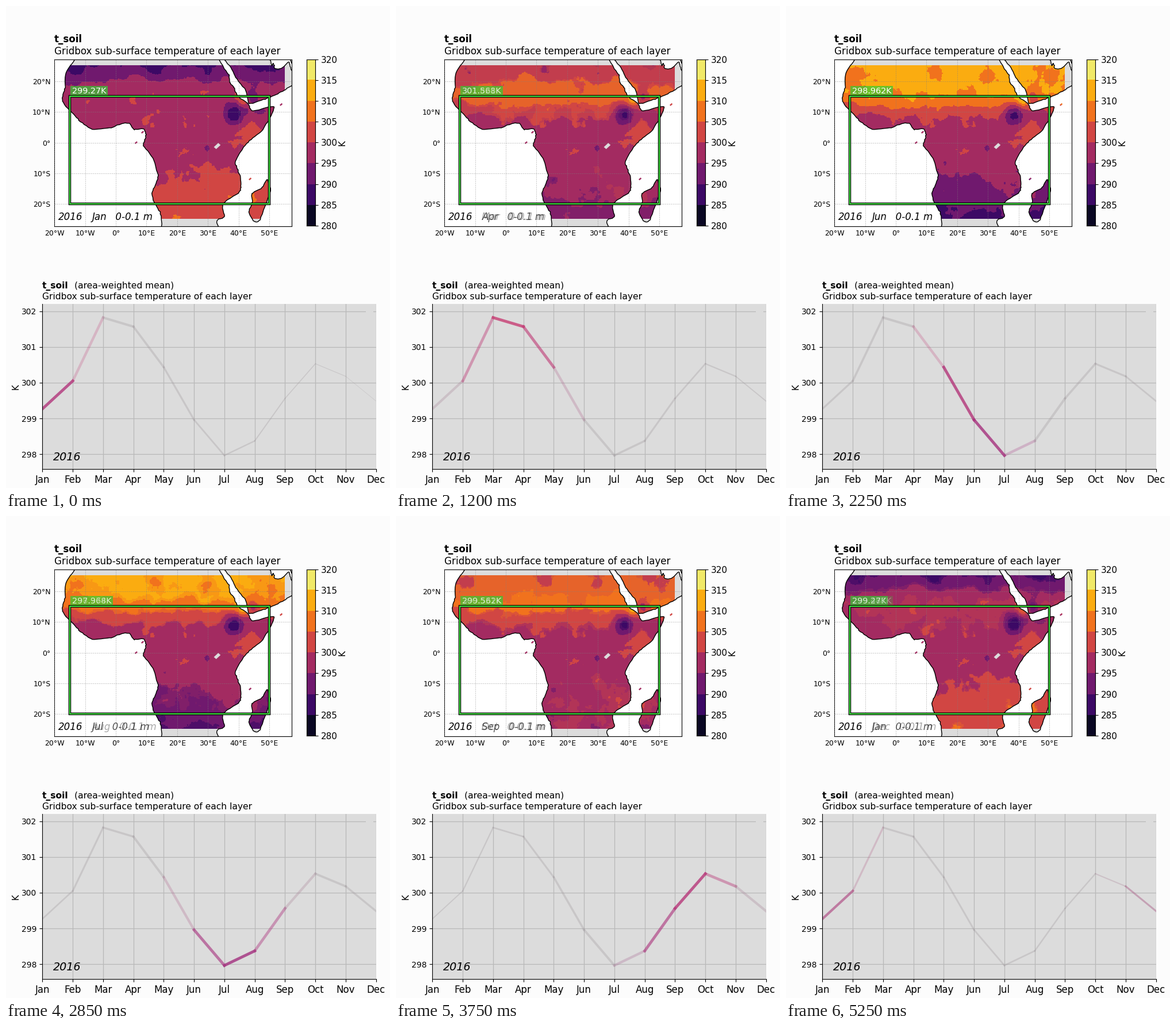
These frames come from a looping animation (668x838 px, 5.4 s). A matplotlib script:

```python
import numpy as np
import matplotlib.pyplot as plt
from matplotlib.animation import FuncAnimation
from matplotlib.patches import PathPatch, Rectangle
from matplotlib.path import Path

W, H, DPI = 668, 838, 100
STEPS = 3  # frames per month
MONTHS = "Jan Feb Mar Apr May Jun Jul Aug Sep Oct Nov Dec".split()
MEANS = [299.27, 300.051, 301.821, 301.568, 300.434, 298.962,
         297.968, 298.374, 299.562, 300.531, 300.179, 299.487]
LAND = "#dcdcdc"
GREEN = "limegreen"
PAPER = "#fcfcfc"
LONG_NAME = "Gridbox sub-surface temperature of each layer"

plt.rcParams["font.family"] = "DejaVu Sans"
inferno, magma = plt.get_cmap("inferno"), plt.get_cmap("magma")
BANDS = inferno((np.arange(8) + 0.5) / 8)[:, :3]
rng = np.random.default_rng(7)

# Key points of the coasts as (lon, lat)
AFRICA = [(-13.4, 27), (-16.2, 22.8), (-16.4, 18), (-17.4, 14.7),
          (-16.7, 12.3), (-13.3, 8.8), (-11.3, 6.7), (-7.6, 4.4), (-2, 4.8),
          (2.5, 6.3), (4.6, 6.2), (6, 4.3), (8.8, 4.6), (9.8, 3), (9.4, 0.5),
          (9, -1), (12, -5), (13.7, -10.7), (13, -13.5), (11.8, -16.5),
          (12.3, -19), (14.4, -22.5), (15, -27), (15, -30), (33, -30),
          (32.8, -25.5), (35.4, -24), (34.8, -20), (39.8, -16.4),
          (40.7, -14.5), (40.5, -11), (39.4, -8), (38.9, -6), (41.4, -1.8),
          (44, 1.1), (47.9, 4.4), (50.9, 9.5), (51.2, 11.8), (44.6, 10.4),
          (43, 12.8), (39.6, 15.3), (38.5, 18), (37.2, 19.5), (36.8, 22),
          (35.4, 24), (33.4, 27.8), (33, 30), (-13, 30)]
ARABIA = [(35, 27.8), (37.2, 24.8), (39.1, 21.2), (42.3, 17), (43.4, 12.7),
          (48, 14), (52.2, 15.7), (55.2, 17.3), (59, 20), (57, 24),
          (56.3, 26.2), (53.8, 24.1), (51.8, 24.2), (51.3, 26), (50.7, 25),
          (49.5, 27.8), (40, 30)]
MADAGASCAR = [(49.3, -12), (50.4, -15.5), (49.3, -18.5), (47, -25),
              (45, -25.6), (43.4, -22.5), (44.4, -19.5), (44.3, -16.6),
              (47.6, -14.6)]
GULF = [(56.4, 28), (57.3, 25.7), (59, 28)]
ISLETS = [(53.8, 12.4), (6.6, 0), (8.7, 3.4), (43.7, -11.8)]
LAKE = (33, -1.1)


def coastline(points, n=6, pull=0.36, rough=0.08):
    """Closed cardinal spline with a little seeded roughness."""
    p1 = np.array(points, float)
    p0, p2, p3 = (np.roll(p1, s, axis=0) for s in (1, -1, -2))
    u = (np.arange(n) / n)[:, None, None]
    ring = ((2 * u**3 - 3 * u**2 + 1) * p1 + (3 * u**2 - 2 * u**3) * p2
            + (u**3 - 2 * u**2 + u) * pull * (p2 - p0)
            + (u**3 - u**2) * pull * (p3 - p1))
    ring = ring.transpose(1, 0, 2).reshape(-1, 2)
    return ring + rough * rng.standard_normal(ring.shape)


def diamond(center, r):
    return np.array(center) + r * np.array([(-1, -0.3), (0.3, 0.9), (1, 0.3),
                                            (-0.3, -0.9)])


def outline(rings):
    return Path.make_compound_path(
        *[Path([*r, r[0]], closed=True) for r in rings])


# Soil temperature field
HILLS_AND_PLAINS = [  # lon, lat, radius, anomaly
    (38.5, 9.2, 3.5, -12), (44.3, 15, 1.7, -7), (41.3, 13.6, 2, 8),
    (43, 4, 5, 5.5), (33, 11, 5, 2.5), (29.6, -2, 1.6, -4.5),
    (15.7, -12.3, 1.5, -4), (38, -15, 5, 2.5), (44.5, -18, 2.5, 3)]
CELL = 0.25
lon, lat = np.meshgrid(np.arange(-18, 54.8, CELL), np.arange(-24.8, 25, CELL))


def noise():
    ny, nx = lon.shape
    k = np.hypot(np.fft.fftfreq(ny, CELL)[:, None], np.fft.fftfreq(nx, CELL))
    spec = np.fft.fft2(rng.standard_normal(lon.shape)) / (k + 0.06) ** 2.2
    spec[0, 0] = 0
    out = np.fft.ifft2(spec).real
    return out / out.std()


def bell(x, center, width):
    return np.exp(-((x - center) / width) ** 2)


def month_image(m, relief):
    north, south = np.maximum(lat - 8, 0), np.maximum(-4 - lat, 0)
    yearly = np.cos(2 * np.pi * (m - 5.5 - 0.35 * np.sign(lat)) / 12)
    twice = np.cos(2 * np.pi * (m - 3.7) / 6)
    t = 298 + 6 * bell(lat, 16, 6) + 0.27 * np.maximum(lat - 16, 0)
    t += (0.68 * north - 0.38 * south) * yearly - 0.07 * south
    t += 2.7 * bell(lat, 13, 5) * twice
    for x, y, r, anomaly in HILLS_AND_PLAINS:
        t += anomaly * bell(lon, x, r) * bell(lat, y, r)
    t += 1.1 * relief
    return BANDS[np.clip((t - 280) // 5, 0, 7).astype(int)]


shores = [coastline(p) for p in (AFRICA, ARABIA, MADAGASCAR)]
relief = noise()
IMAGES = [month_image(m, relief) for m in range(12)]


# Layout, in pixels from the top left
fig = plt.figure(figsize=(W / DPI, H / DPI), dpi=DPI, facecolor=PAPER)


def add_axes(x0, y0, x1, y1, **kw):
    return fig.add_axes([x0 / W, 1 - y1 / H, (x1 - x0) / W, (y1 - y0) / H], **kw)


page = add_axes(0, 0, W, H, zorder=5)
page.set(xlim=(0, W), ylim=(H, 0))
page.axis("off")


def write(x, y, s, size, **kw):
    return page.text(x, y, s, fontsize=size, **kw)


def degrees(values, negative, positive):
    return [f"{abs(v)}°{negative if v < 0 else positive if v else ''}"
            for v in values]


# Map
world = add_axes(84, 92.6, 497.3, 382.6)
world.set_facecolor("white")
coast = outline(shores + [GULF])
world.add_patch(PathPatch(coast, fc=LAND, ec="none", zorder=1))
soil = world.imshow(IMAGES[0], origin="lower", aspect="auto",
                    extent=(-18, 54.8, -24.8, 25),
                    interpolation="nearest", zorder=2)
soil.set_clip_path(outline(shores + [diamond(c, 0.5) for c in ISLETS]),
                   world.transData)
world.add_patch(PathPatch(outline([diamond(LAKE, 1.1)]), fc=LAND, ec="none",
                          zorder=3))
world.add_patch(PathPatch(coast, fc="none", ec="black", lw=1, zorder=4))
world.set(xlim=(-20.02, 57.3), ylim=(-27.13, 27.13))
east, up = range(-20, 51, 10), range(-20, 21, 10)
world.set_xticks(east, degrees(east, "W", "E"))
world.set_yticks(up, degrees(up, "S", "N"))
world.tick_params(length=0, pad=4.7, labelsize=9)
world.set_axisbelow(False)
world.grid(color="gray", alpha=0.55, lw=0.5, ls="--")
for lw, color in ((3.2, "black"), (1.5, "#3fdc3f")):
    world.add_patch(Rectangle((-15, -20), 65, 35, fc="none", ec=color, lw=lw,
                              zorder=6, joinstyle="miter"))

write(83.5, 63, "t_soil", 12.1, weight="bold")
write(83.5, 84.5, LONG_NAME, 12.05)
write(91, 371.5, "2016", 12, style="italic")
tag_end = Rectangle((177, 139), 9, 16, fc=GREEN, lw=0)
page.add_patch(Rectangle((112, 139), 65, 16, fc=GREEN, alpha=0.7, lw=0))
page.add_patch(tag_end)
stamps = [write(149.4, 371.5, "", 12, style="italic") for _ in range(2)]
values = [write(114.5, 151.5, "", 10.4, color="white") for _ in range(2)]

# Colour bar
bar = add_axes(523, 92.6, 538, 382)
bar.imshow(BANDS[:, None], origin="lower", aspect="auto",
           extent=(0, 1, 280, 320), interpolation="nearest")
bar.set_xticks([])
bar.set_yticks(range(280, 321, 5))
bar.yaxis.tick_right()
bar.tick_params(labelsize=11)
write(585, 238, "K", 11, rotation=90, ha="center", va="center")

# Chart
chart = add_axes(63.4, 517.5, 643.7, 804.9, facecolor=LAND)
chart.set(xlim=(0, 11), ylim=(297.59, 302.21))
chart.set_xticks(range(12), MONTHS, fontsize=12)
chart.set_yticks(range(298, 303))
chart.tick_params(axis="y", labelsize=10)
chart.set_axisbelow(True)
chart.grid(color="#b8b8b8", lw=0.9)
chart.spines[["top", "right"]].set_visible(False)
page.add_patch(Rectangle((626, 523), 13, 14, fc=LAND, lw=0))
write(63, 491, "t_soil", 11.2, weight="bold")
write(119, 491, "(area-weighted mean)", 11.2)
write(63, 510, LONG_NAME, 11.2)
write(82, 790, "2016", 13.8, style="italic")
write(17, 661.5, "K", 11, rotation=90, ha="center", va="center")
segments = [chart.plot([k, k + 1], MEANS[k:k + 2],
                       solid_capstyle="projecting")[0] for k in range(11)]


def segment_style(k, m):
    """Colour, opacity and width in pixels of segment k in month m."""
    d = abs(k + 0.5 - m)
    rgb = np.array(magma((sum(MEANS[k:k + 2]) / 2 - 280) / 40)[:3])
    width = 4.9 - 0.42 * (d - 0.5)
    if d < 1:
        return rgb, 0.8, width
    if d < 2:
        return rgb, 0.24, width
    return np.array([0.61, 0.58, 0.6]), 0.3, width


def update(i):
    a, part = divmod(i, STEPS)
    b, w = (a + 1) % 12, part / STEPS
    fades = ((a, 1 - w), (b, w))

    soil.set_data((1 - w) * IMAGES[a] + w * IMAGES[b])
    for (m, f), stamp, value in zip(fades, stamps, values):
        stamp.set(text=f"{MONTHS[m]}   0-0.1 m", alpha=f)
        value.set(text=f"{MEANS[m]}K", alpha=f)
    # January's shorter value needs no tag extension
    tag_end.set_alpha(0.7 * sum(f for m, f in fades if m != 0))

    for k, line in enumerate(segments):
        styles = [(*segment_style(k, m), f) for m, f in fades]
        alpha = sum(o * f for _, o, _, f in styles)
        rgb = sum(c * o * f for c, o, _, f in styles) / alpha
        width = sum(p * o * f for _, o, p, f in styles) / alpha
        line.set(color=rgb, alpha=alpha, linewidth=width * 72 / DPI)
    return []


anim = FuncAnimation(fig, update, frames=12 * STEPS, interval=150, repeat=True,
                     repeat_delay=0, blit=False)
plt.show()
```
